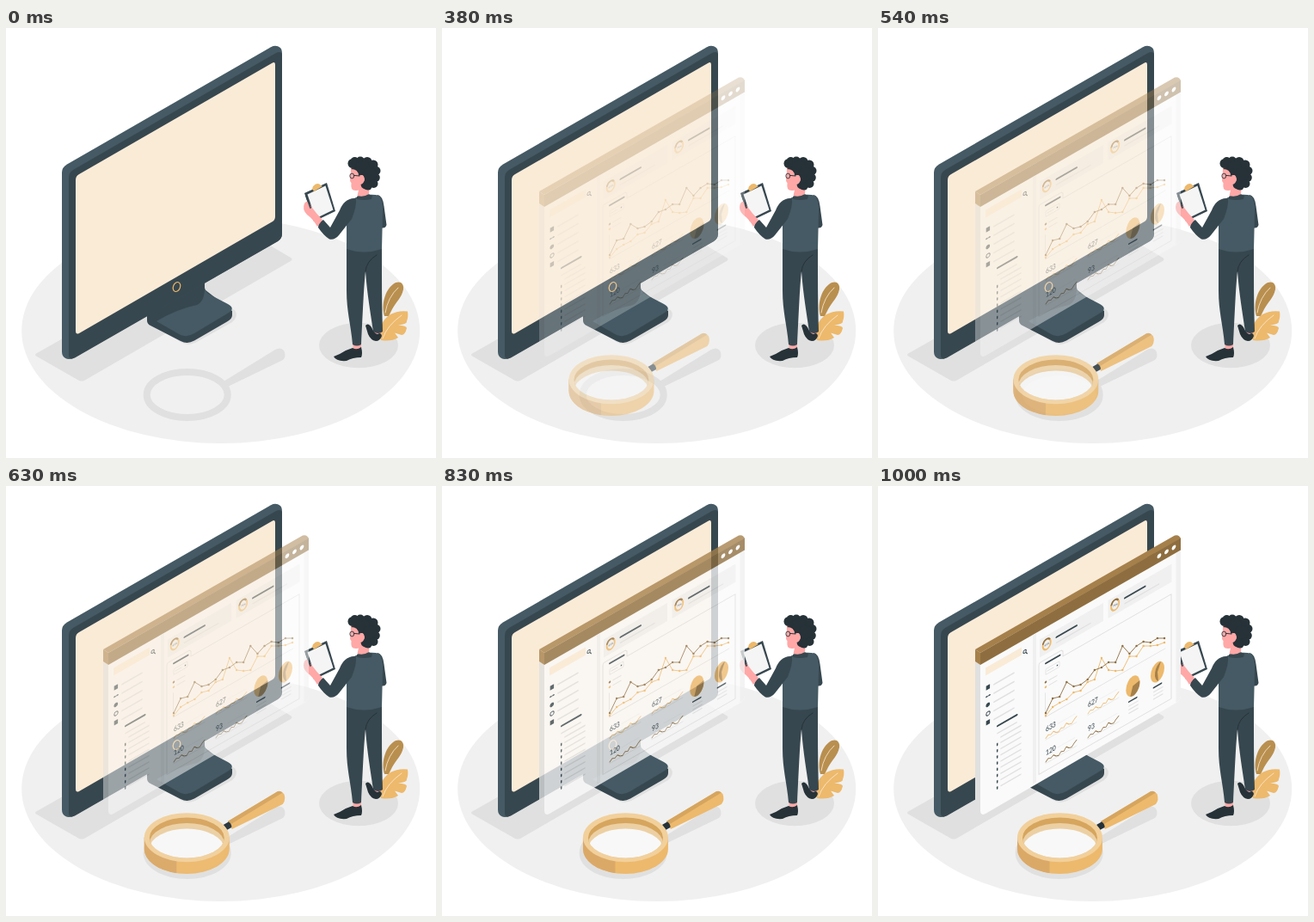
An HTML page that plays this animation: 500x500 px, repeating every 1.04 s.

```html
<!DOCTYPE html>
<html lang="en">
<head>
<meta charset="utf-8">
<title>Desktop dashboard</title>
<style>
  html, body { margin: 0; width: 100%; height: 100%; overflow: hidden; background: #fff; }
  svg { display: block; width: 100vw; height: 100vh; }
  text { font: 500 8.5px Lato, Arial, sans-serif; fill: #37474f; }
  .line { fill: none; stroke-linejoin: round; stroke-linecap: round; }
</style>
</head>
<body>
<svg viewBox="0 0 500 500">
  <defs>
    <clipPath id="hole"><ellipse cx="211.5" cy="409" rx="43.5" ry="23.5"/></clipPath>
  </defs>

  <!-- floor and shadows -->
  <ellipse cx="249.7" cy="352" rx="231.5" ry="131" fill="#f0f0f0"/>
  <g fill="#e0e0e0">
    <path d="M36 378 L66 361 L298 250 Q301 249 304 251 L331 267 Q334 269 331 271 L91 410 Q88 411 85 410 L36 382 Q32 380 36 378Z"/>
    <path d="M170 346 L203 365 Q211 370 220 366 L263 342 Q271 335 266 328 L240 318Z"/>
    <ellipse cx="410" cy="369" rx="46" ry="26.3"/>
    <path d="M253 411 L313 374 Q320 370 323.5 376 Q326 382 322 386 L258 417Z"/>
  </g>
  <ellipse cx="210.7" cy="426.5" rx="47" ry="26.5" fill="none" stroke="#e0e0e0" stroke-width="8"/>

  <!-- monitor -->
  <path d="M164 333 L231 294 V304 L263 329 V334 Q263 338 257 341.5 L219 363.5 Q211 368 203 364 L168 346 Q164 344 164 340Z" fill="#37474f"/>
  <path d="M175 341 Q198 327 222 322 Q231 318 231 302 Q232 307 237 310 L258 321 Q267 326 259 331 L219 355 Q211 360 203 357Z" fill="#455a64"/>
  <path d="M65 168 Q65 162 71 158.5 L308 22.2 Q314 19 319 23 Q321 25 321 30 V239 Q321 245 316 248 L78 384 Q70 387 66 381 Q65 379 65 376Z" fill="#455a64"/>
  <path d="M73 174 Q73 168 78 165 L314 29 Q321 26 321 32 V239 Q321 245 316 248 L80 383.5 Q73 387 73 380Z" fill="#37474f"/>
  <path d="M81 177 Q81 172 85 170 L309 41 Q313 38 313 43 V219 Q313 223 310 225 L85 355 Q81 357 81 352Z" fill="#faebd7"/>
  <ellipse cx="198.5" cy="301" rx="4" ry="5.7" transform="rotate(22 198.5 301)" fill="none" stroke="#edb96c" stroke-width="1.2"/>

  <!-- plant -->
  <path d="M440 335 C436 321 441 305 450 298 C457 293 463 296 462 304 C460 314 453 319 449 327 L445 335Z" fill="#b98f4f"/>
  <path class="line" d="M441 331 Q444 313 456 302" stroke="#faebd7" stroke-width=".8"/>
  <path d="M436 363 C433 350 437 339 447 333 Q456 328 467 329.500 Q468 336 466 341 Q467 344 456 345.500 Q466 346 466 349 Q464 357 460 357 L452 354.500 L456 360 Q448 365 436 363Z" fill="#edb96c"/>
  <path class="line" d="M438 361 Q443 346 460 334" stroke="#faebd7" stroke-width=".8"/>

  <!-- person -->
  <g fill="#ffa8a7">
    <path d="M403 365 H413 V376 H404Z"/>
    <path d="M427 350 H436 V359 H428Z"/>
  </g>
  <g fill="#263238">
    <path d="M403 372 Q408 375 413 371 Q415 379 413 383 Q403 383 396 387 Q384 388 381 382 Q389 379 395 375Z"/>
    <path d="M418 346 Q421 342 425 348 Q428 355 432 356 Q436 353 437 358 Q435 364 430 364 Q424 363 421 356Z"/>
  </g>
  <path d="M396 254 Q416 266 437 254 V285 Q437 322 438 353 Q433 357 427 353 C424 332 420 310 418 283 C416 300 415 330 413 368 Q408 371 403 368 C401 345 396 330 396 305Z" fill="#37474f"/>
  <path class="line" d="M418 283 Q419 271 431 264" stroke="#263238" stroke-width="1"/>
  <path d="M432 194 Q438 195 439.5 207 L442.5 229 Q441 234 435 232Z" fill="#37474f"/>
  <path d="M403 199 C412 194 425 193 433 194.500 Q439 199 438 215 L437 257 Q416 264 396 257 V230 Q397 205 403 199Z" fill="#455a64"/>
  <path d="M407 198 C397 197 391 204 388 212 L377 232 L369 223 Q363 226 363 232 Q369 241 376 245.500 Q382 247 387 241 L402 222 Q408 207 407 198Z" fill="#37474f"/>
  <path d="M408 196 Q417 190 426 195 L425 199 Q416 201 408 199Z" fill="#37474f"/>

  <path d="M347 192 L373 180 L383 213 L358 225Z" fill="#37474f"/>
  <path d="M350.5 193.5 L371.5 183.5 L380.5 211.5 L360 221.5Z" fill="#f5f5f5"/>
  <path d="M356 187 Q357 183 360 181.5 Q364 180 366 183 L368 184 L358 190Z" fill="#edb96c"/>
  <path d="M368 223 L362 231 Q357 222 350 217 Q344 211 347 204 Q350 200 352 203 L356 209 Q361 216 368 223Z" fill="#ffa8a7"/>
  <path class="line" d="M349 195 L354 209" stroke="#37474f" stroke-width="1.8"/>

  <path d="M401 163 Q401 171 400 177 Q400 179 401.5 180 Q401 184 402 187 Q404 190 410 188.500 L408.500 195 Q416 197 422 193 L424 170 L414 160Z" fill="#ffa8a7"/>
  <g id="hair" fill="#263238">
    <path d="M401 164 Q410 164 410 172 Q417 169 417 176 Q416 181 412.500 182 Q413 188 422 188 L431 181 L431 162 L415 155Z"/>
  </g>
  <ellipse cx="413.5" cy="175.5" rx="3.2" ry="4.300" fill="#ffa8a7"/>
  <path class="line" d="M411 172 L405 171.500" stroke="#263238" stroke-width="1"/>
  <ellipse cx="402.300" cy="172" rx="2.400" ry="2.900" fill="none" stroke="#263238" stroke-width=".9"/>

  <!-- dashboard window -->
  <g id="win" opacity="0">
    <path d="M113 190 L345 57.500 Q350 56 352 61 L119 194Z" fill="#a6804b"/>
    <path d="M113 204 L119 208 V382 Q113 380 113 375Z" fill="#e0e0e0"/>
    <path d="M113 190 L119 194 V208 L113 204Z" fill="#a6804b"/>
    <path d="M119 207 L352 74 V243 Q352 249 347 252 L125 381 Q119 384 119 377Z" fill="#fafafa"/>
    <path d="M346.500 78 L352 75 V243 Q352 249 346.500 252Z" fill="#f0f0f0"/>
    <g id="plane" transform="matrix(1 -.573 0 1 0 68.2)"></g>
    <g id="chart"></g>
  </g>

  <!-- magnifier -->
  <g id="lens" opacity="0">
    <path d="M259 390 L314 357 Q320 353 324.500 358 Q327 365 323 370 L264 399Z" fill="#edb96c"/>
    <path d="M259 390 L314 357 Q319 353 323 356.500 L261.500 394Z" fill="#d6a55e"/>
    <path d="M254 394 L260 390.500 Q264 393 263.500 397 L258 400Z" fill="#263238"/>
    <path d="M162 408.500 V422 A49.500 29 0 0 0 261 422 V408.500Z" fill="#edb96c"/>
    <path d="M162 408.500 V422 A49.500 29 0 0 0 199.500 450.200 V408.500Z" fill="#dba967"/>
    <ellipse cx="211.5" cy="408.700" rx="49.5" ry="28.5" fill="#f2d09b"/>
    <g clip-path="url(#hole)">
      <rect x="165" y="383" width="93" height="52" fill="#d6a55e"/>
      <ellipse cx="211.5" cy="415.5" rx="43.5" ry="23.5" fill="#ecd0a4"/>
      <ellipse cx="211.5" cy="422" rx="43.5" ry="23.5" fill="#f8f8f8"/>
    </g>
  </g>
</svg>
<script>
const NS = 'http://www.w3.org/2000/svg';
const $ = id => document.getElementById(id);
const plane = $('plane'), chart = $('chart');
const DARK = '#37474f', PALE = '#e0e0e0', TAN = '#edb96c', BROWN = '#8e6e40', SOFT = '#f0f0f0';

function add(parent, tag, attrs, text) {
  const el = document.createElementNS(NS, tag);
  for (const k in attrs) el.setAttribute(k, attrs[k]);
  if (text) el.textContent = text;
  parent.append(el);
}
const rect = (x, y, width, height, fill) => add(plane, 'rect', { x, y, width, height, fill });
const dot = (parent, cx, cy, r, fill) => add(parent, 'circle', { cx, cy, r, fill });
const path = (parent, d, stroke, w = 1) =>
  add(parent, 'path', { d, stroke, 'stroke-width': w, class: 'line' });
const bar = (x1, x2, y, stroke, w) => path(plane, `M${x1} ${y}H${x2}`, stroke, w);
const label = (x, y, s, kx = .8, ky = 1) =>
  add(plane, 'text', { transform: `translate(${x} ${y}) scale(${kx} ${ky})` }, s);

// curls: x, y, radius
[[403, 157.5, 5.5], [405.5, 154.5, 4.5], [412, 154.5, 5], [420, 155.5, 5.5], [427, 159, 5.5], [430.5, 166, 5],
 [430, 174, 4.8], [427.5, 181, 5], [421, 184, 4.5], [415, 162, 8], [423, 170, 8]]
  .forEach(([x, y, r]) => dot($('hair'), x, y, r, '#263238'));

// header
rect(119, 194, 233, 14, BROWN);
[327, 335.5, 344].forEach(x => dot(plane, x, 200.4, 2.4, '#fff'));

// sidebar
rect(125, 215, 42, 9, '#faebd7');
dot(plane, 170.6, 222, 2.2, DARK);
dot(plane, 170.6, 222, 1.2, '#fafafa');
path(plane, 'M172 224L173.5 226', DARK, 1);
for (let i = 0; i < 5; i++) {
  const y = 239 + i * 10.2;
  if (i === 1) path(plane, `M126 ${y}h1M129 ${y}h1`, DARK, 1.6);
  else if (i === 3) add(plane, 'circle', { cx: 128, cy: y, r: 2.2, fill: 'none', stroke: DARK, 'stroke-width': 1 });
  else if (i === 2) dot(plane, 127.8, y, 2.4, DARK);
  else rect(125.7, y - 2.4, 4.4, 5, DARK);
  bar(135, 158, y + .8, PALE, 1.7);
}
bar(139, 161.5, 290.5, DARK, 2.1);
bar(139, 161, 299, PALE, 1.6);
bar(143, 166, 305.5, PALE, 1.6);
for (let i = 0; i < 8; i++) {
  const y = 311.8 + i * 7.2;
  path(plane, `M138.7 ${y - 1}v2`, DARK, 1.5);
  bar(143, 166, y, PALE, 1.5);
}
rect(180, 208.5, 4, 173, SOFT);

// summary cards
[[188, 65], [267.5, 75]].forEach(([x, pct]) => {
  rect(x, 218, 74, 21, SOFT);
  const cx = x + 8.2, ring = { cx, cy: 228, rx: 4.6, ry: 6, fill: 'none', 'stroke-width': 1.8 };
  add(plane, 'ellipse', { ...ring, stroke: TAN });
  add(plane, 'ellipse', { ...ring, stroke: BROWN, pathLength: 100, 'stroke-dasharray': '35 65', 'stroke-dashoffset': -55 });
  label(cx - 2.6, 229.4, pct + '%', .34, .34);
  bar(x + 19.5, x + 43, 226.5, DARK, 2);
  bar(x + 19.5, x + 59, 233, PALE, 1.4);
});

// main panel
path(plane, 'M187 374.5V247Q187 245 189 245H213L215 247V253H341V374.5Z', PALE, 1);
bar(195, 211.5, 249.7, DARK, 2);
add(plane, 'rect', { x: 195, y: 256.5, width: 16, height: 6.5, rx: 1, fill: 'none', stroke: PALE, 'stroke-width': .8 });
bar(197, 204, 259.8, PALE, 1);
dot(plane, 208.5, 259.8, .8, DARK);
[[271.5, BROWN], [277.3, TAN]].forEach(([y, c]) => {
  dot(plane, 195, y, 1.3, c);
  bar(199, 208, y, PALE, 1.1);
});
path(plane, 'M194.5 284V312H334', PALE, .8);

// line chart: heights at even steps
function series(ys, color) {
  const pts = ys.map((y, i) => [195 + i * 8.12, y]);
  path(chart, 'M' + pts.map(p => p.join(' ')).join('L'), color, .9);
  pts.forEach(([x, y]) => dot(chart, x, y, 1.2, color));
}
series([267, 257, 252, 248, 240, 238, 228, 225, 200, 214, 215, 214, 198, 198, 186, 186, 185, 182], TAN);
series([264, 247, 245, 228, 233, 231, 225, 214, 211, 205, 205, 186, 195, 186, 181, 182, 177, 177], BROWN);

// counters with small trend lines
const trend = [0, -2.5, -1, -3, 0, 1, -2, -.5, -4, -1, 0, -3, -5];
[[195, 329.5, '633', TAN], [244, 329, '627', TAN], [195, 357, '120', BROWN], [244, 357, '93', BROWN]]
  .forEach(([x, y, s, c]) => {
    label(x, y, s);
    bar(x + 14, x + 34, y - 1.5, SOFT, 1);
    bar(x, x + 36, y + 9.2, PALE, .6);
    path(plane, 'M' + trend.map((d, i) => `${x + i * 3} ${y + 7.5 + d}`).join('L'), c, .9);
  });

// pies
[[296.3, 'M0 0L8 -2A8 11.5 0 0 1 -3 10.6Z'], [325, 'M0 0L1 11.4A8 11.5 0 0 1 4 -10Z']].forEach(([x, d]) => {
  add(plane, 'ellipse', { cx: x, cy: 334.2, rx: 8, ry: 11.5, fill: TAN });
  add(plane, 'path', { d, transform: `translate(${x} 334.2)`, fill: '#a6804b' });
  bar(x - 4.5, x + 4.5, 350, DARK, 1.7);
  [355, 359.2, 363.4].forEach(y => bar(x - 4.5, x + 6, y, PALE, 1.2));
});

// cubic-bezier(.36, -.01, .5, 1.38)
const curve = (s, a, b) => 3 * s * (1 - s) ** 2 * a + 3 * s * s * (1 - s) * b + s ** 3;
function ease(p) {
  let lo = 0, hi = 1;
  for (let i = 0; i < 24; i++) {
    const mid = (lo + hi) / 2;
    if (curve(mid, .36, .5) < p) lo = mid; else hi = mid;
  }
  return curve(hi, -.01, 1.38);
}

// the picture advances in 24 steps per second
const LOOP = 1040, FPS = 24, LEAD = .015;
const start = performance.now();
function draw() {
  const t = (performance.now() - start) % LOOP;
  const step = Math.floor((t + 5) * FPS / 1000);
  const p = step ? Math.min(1, step / FPS + LEAD) : 0;
  const e = p ? ease(p) : 0;
  $('win').setAttribute('opacity', p ** 1.5);
  $('lens').setAttribute('opacity', Math.max(0, Math.min(1, e)));
  $('lens').setAttribute('transform', `translate(${(30 * (e - 1)).toFixed(2)} 0)`);
  requestAnimationFrame(draw);
}
draw();
</script>
</body>
</html>
```
